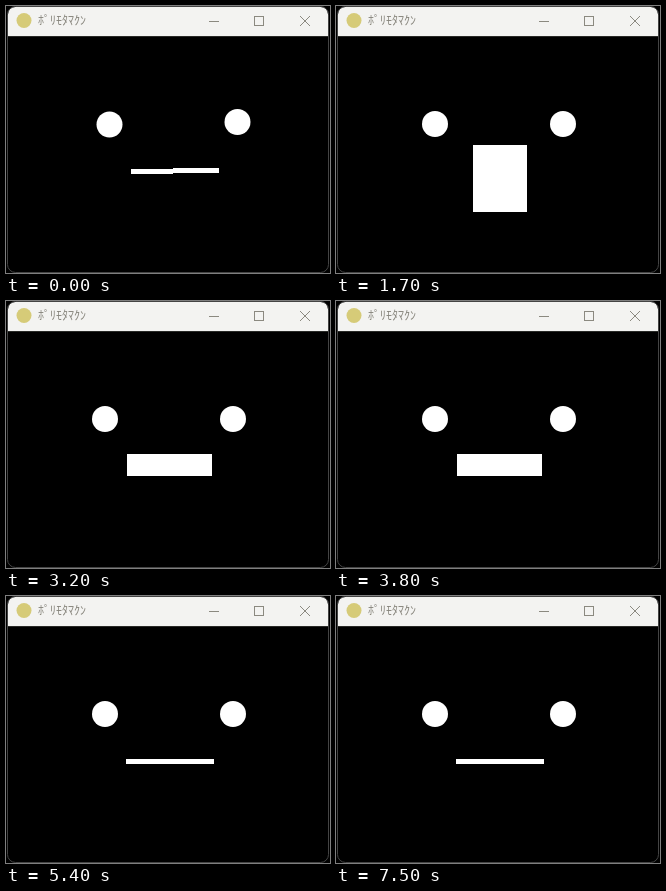
Animation of 324 by 267 pixels, one loop 7600 ms. Source, as an HTML page with a canvas:

```html
<!DOCTYPE html>
<html lang="ja">
<head>
<meta charset="utf-8">
<title>Talking face</title>
<style>
  html, body { margin: 0; width: 100%; height: 100%; overflow: hidden; background: #000; }
  canvas { display: block; width: 324px; height: 267px; }
</style>
</head>
<body>
<canvas id="stage" width="324" height="267"></canvas>
<script>
const ctx = document.getElementById('stage').getContext('2d');
const LOOP = 7600, STEP = 100, TILT_END = 300;

// One mouth shape per step; the mouth stays shut after the last one.
const SPEECH =
  '---iai--' +
  'iaaooai-iaooaiii' +
  '-iaai---ii-i--' +
  'iaoai---iaai-iai-iaooai-iaooai';

const MOUTHS = {
  '-': [120, 163, 88, 5],
  i: [121, 153, 85, 22],
  a: [137, 139, 54, 67],
  o: [138, 136, 51, 73]
};

function rect(color, x, y, w, h) {
  ctx.fillStyle = color;
  ctx.fillRect(x, y, w, h);
}

function disc(color, x, y, r) {
  ctx.fillStyle = color;
  ctx.beginPath();
  ctx.arc(x, y, r, 0, Math.PI * 2);
  ctx.fill();
}

function line(x1, y1, x2, y2) {
  ctx.beginPath();
  ctx.moveTo(x1, y1);
  ctx.lineTo(x2, y2);
  ctx.stroke();
}

function roundedPath(x, y, w, h, r) {
  ctx.beginPath();
  ctx.moveTo(x + r, y);
  ctx.arcTo(x + w, y, x + w, y + h, r);
  ctx.arcTo(x + w, y + h, x, y + h, r);
  ctx.arcTo(x, y + h, x, y, r);
  ctx.arcTo(x, y, x + w, y, r);
  ctx.closePath();
}

function drawWindow() {
  rect('#000', 0, 0, 324, 267);
  ctx.save();
  roundedPath(2, 1, 320, 265, 7);
  ctx.clip();
  rect('#f3f3f1', 2, 1, 320, 29);
  rect('#52544f', 2, 30, 320, 0.5);
  ctx.restore();

  ctx.lineWidth = 1;
  ctx.strokeStyle = '#444';
  roundedPath(1.5, 0.5, 321, 266, 8);
  ctx.stroke();

  disc('#d6cb78', 18, 14.5, 7.5);
  ctx.fillStyle = '#85837a';
  ctx.font = '300 12px "Noto Sans CJK JP", "Noto Sans CJK", sans-serif';
  ctx.fillText('ﾎﾟﾘﾓﾀﾏｸﾝ', 32, 19);

  ctx.strokeStyle = '#8b8980';
  line(203, 15.5, 213, 15.5);
  ctx.strokeRect(248.5, 10.5, 9, 9);
  line(294, 10, 304, 20);
  line(304, 10, 294, 20);
}

function drawFace(t) {
  if (t < TILT_END) {
    disc('#fff', 103.5, 118.5, 13);
    disc('#fff', 231.5, 116, 13);
    rect('#fff', 125, 163, 42, 5);
    rect('#fff', 167, 162, 46, 5);
    return;
  }
  disc('#fff', 99, 118, 13);
  disc('#fff', 227, 118, 13);
  rect('#fff', ...MOUTHS[SPEECH[Math.floor(t / STEP)] || '-']);
}

const start = performance.now();

function render() {
  drawWindow();
  drawFace(Math.max(0, performance.now() - start) % LOOP);
  requestAnimationFrame(render);
}
render();
</script>
</body>
</html>
```
